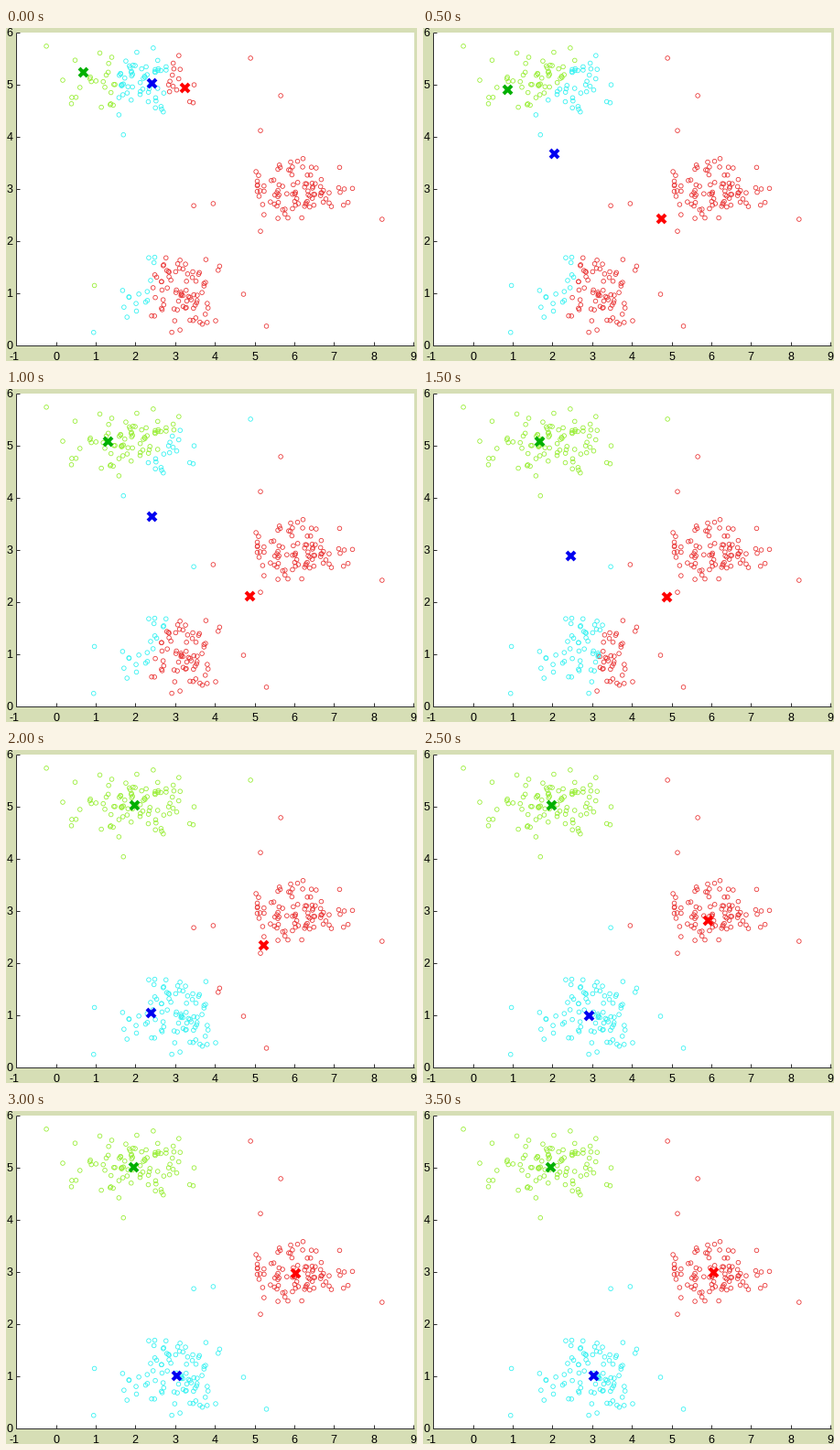
Write a matplotlib script that moves like this. It is 449 px wide and 364 px high and loops after 4.5 s.

```python
import numpy as np
import matplotlib.pyplot as plt
from matplotlib.animation import FuncAnimation
from matplotlib.patches import Rectangle

W, H, DPI = 449, 364, 100
PX = 72 / DPI                       # points per pixel
ORIGIN = np.array([54.5, 347.0])    # pixel position of data (0, 0)
UNIT = np.array([43.4, -57.0])      # pixels per data unit
LEFT, TOP, RIGHT, BOTTOM = 10.5, 5, 446, 346.5
INK = "#303030"
POINT_COLORS = np.array(["#98ee34", "#34f2f2", "#ea3434"])
CENTER_COLORS = ["#00b000", "#0000f0", "#ff0000"]

# Green, blue and red centroid at each k-means step, in data units.
STEPS = np.array([
    [(0.67, 5.25), (2.40, 5.03), (3.23, 4.95)],
    [(0.86, 4.92), (2.05, 3.69), (4.73, 2.43)],
    [(1.31, 5.09), (2.41, 3.65), (4.87, 2.13)],
    [(1.68, 5.08), (2.46, 2.90), (4.88, 2.11)],
    [(1.97, 5.03), (2.38, 1.06), (5.22, 2.35)],
    [(1.98, 5.04), (2.91, 1.00), (5.90, 2.82)],
    [(1.95, 5.02), (3.03, 1.01), (6.02, 2.99)],
    [(1.95, 5.02), (3.04, 1.02), (6.04, 3.00)],
])

# Lone points that stand clear of the clouds.
OUTLIERS = [(-0.24, 5.74), (4.9, 5.51), (5.66, 4.79), (5.15, 4.12),
            (1.7, 4.04), (3.47, 2.68), (3.96, 2.72), (8.21, 2.42),
            (5.15, 2.19), (0.97, 1.15), (0.95, 0.25), (5.3, 0.37)]

rng = np.random.default_rng(12)


def cloud(center, spread, count=95, reach=2.2):
    """Normal cluster without its far tails."""
    z = rng.normal(size=(count * 2, 2))
    z = z[np.hypot(*z.T) < reach][:count]
    return center + z * spread


data = np.vstack([
    OUTLIERS,
    cloud((1.95, 5.04), (0.93, 0.32)),
    cloud((6.06, 2.98), (0.78, 0.29)),
    cloud((3.05, 1.02), (0.84, 0.35)),
])
points = ORIGIN + data * UNIT

fig = plt.figure(figsize=(W / DPI, H / DPI), dpi=DPI, facecolor="#d6deb5")
ax = fig.add_axes([0, 0, 1, 1])
ax.set(xlim=(0, W), ylim=(H, 0))
ax.axis("off")
ax.add_patch(Rectangle((LEFT, TOP), RIGHT - LEFT, BOTTOM - TOP,
                       facecolor="white", edgecolor="none"))


def rule(xs, ys):
    ax.plot(xs, ys, color=INK, lw=PX, solid_capstyle="butt", zorder=2)


def label(x, y, value, align):
    ax.text(x, y, str(value), ha=align, va="baseline", fontsize=12.5 * PX,
            family="Liberation Sans", color="black")


rule([LEFT, LEFT], [TOP, BOTTOM])
rule([LEFT, RIGHT], [BOTTOM, BOTTOM])
for value in range(-1, 10):
    x = ORIGIN[0] + value * UNIT[0]
    rule([x, x], [BOTTOM, BOTTOM - 4])
    label(x - (2 if value < 0 else 0), 363, value, "center")
for value in range(7):
    y = ORIGIN[1] + value * UNIT[1] - 0.5
    rule([LEFT, LEFT + 4], [y, y])
    label(7.5, y + 4.5, value, "right")

dots = ax.scatter(points[:, 0], points[:, 1], s=(4.6 * PX) ** 2,
                  facecolors="none", linewidths=0.8 * PX, zorder=3)
crosses = [ax.plot([], [], "x", color=color, ms=9 * PX, mew=4 * PX,
                   zorder=4)[0] for color in CENTER_COLORS]


def update(frame):
    centers = STEPS[min(frame, len(STEPS) - 1)]
    distance = np.linalg.norm(data[:, None] - centers, axis=2)
    dots.set_edgecolors(POINT_COLORS[distance.argmin(axis=1)])
    for cross, center in zip(crosses, centers):
        x, y = ORIGIN + center * UNIT
        cross.set_data([x], [y])
    return [dots, *crosses]


# The last step is held for two frames.
anim = FuncAnimation(fig, update, frames=len(STEPS) + 1, interval=500,
                     repeat=True, repeat_delay=0)
plt.show()
```
